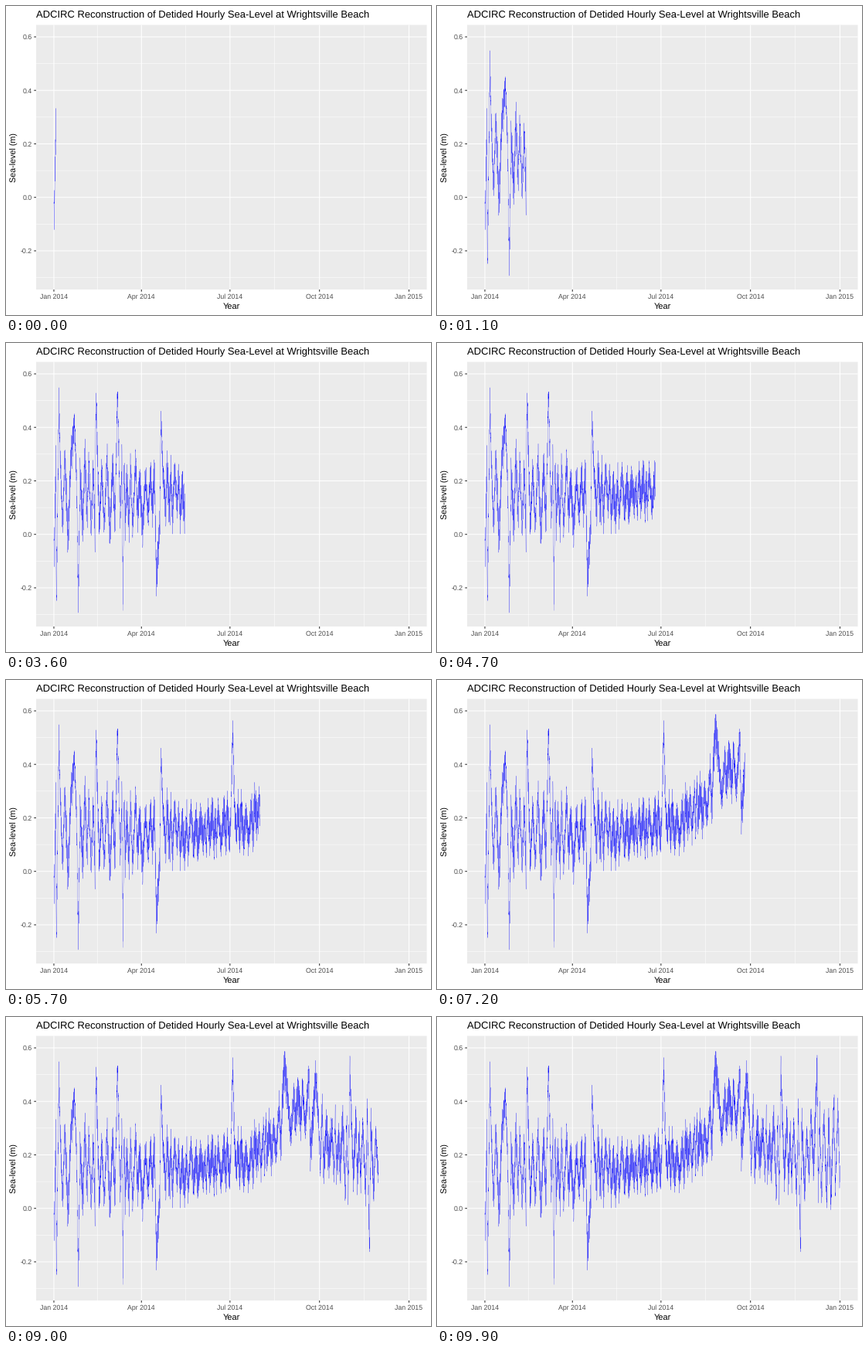
A matplotlib script for the animation above (10 s loop, 550 by 400 pixels).

```python
import numpy as np
import matplotlib.pyplot as plt
from matplotlib.animation import FuncAnimation
from matplotlib.patches import Rectangle

W, H, DPI = 550, 400, 100
FRAMES, INTERVAL = 100, 100
LEFT, RIGHT, TOP, BOTTOM = 39, 544.5, 24.5, 367
X0, X1 = 61.97, 521.5          # 1 January 2014 and 2015
Y0, METRE = 247.7, 346.2       # zero level and pixels per metre
PX = 0.72                      # points per pixel

plt.rcParams["font.family"] = "Liberation Sans"
plt.rcParams["path.simplify"] = False
plt.rcParams["text.hinting"] = "none"

# The year's main surges: x in pixels, level in metres.
STORMS = [
    (62, -0.1), (64.6, 0.26), (65.2, -0.28), (68.5, 0.5), (88.5, 0.42),
    (93.6, -0.25), (116.4, 0.52), (144.3, 0.54), (151.5, -0.28),
    (194.6, -0.17), (200.5, 0.45), (293.4, 0.54), (360.5, 0.54),
    (392, 0.51), (401, 0.49), (445, 0.52), (470.5, -0.16), (492, 0.54),
]


def day_x(day):
    return X0 + (X1 - X0) * day / 365


def level_y(level):
    return Y0 - METRE * level


def seasonal_mean(t):
    return 0.12 + 0.1 * t + 0.17 * np.exp(-((t - 0.68) / 0.08) ** 2)


def seasonal_swing(t):
    return 0.08 + 0.12 * np.cos(np.pi * t) ** 2


def turning_points(rng):
    """Alternating random highs and lows, with the main surges in between."""
    storm_x = np.array(STORMS)[:, 0]
    points, x, side = list(STORMS), X0 + 8, 1
    while x < X1 + 5:
        t = (x - X0) / (X1 - X0)
        level = seasonal_mean(t) + side * seasonal_swing(t) * rng.uniform(0.3, 1)
        if np.abs(storm_x - x).min() > 1.2:
            points.append((x, level))
        x += rng.uniform(1.2, 4.2)
        side = -side
    return np.array(sorted(points)).T


def sea_level():
    """Hourly levels: surge between turning points plus a residual tide."""
    rng = np.random.default_rng(2014)
    hours = np.arange(365 * 24)
    x = day_x(hours / 24)
    surge = np.interp(x, *turning_points(rng))
    tide = (0.75 * np.cos(2 * np.pi * hours / 12.42)
            + 0.25 * np.cos(2 * np.pi * hours / 23.93))
    spring = 0.065 + 0.015 * np.cos(2 * np.pi * hours / (14.77 * 24))
    level = surge + spring * tide + rng.normal(0, 0.006, len(x))
    level[(level < -0.3) | (level > 0.59)] = np.nan
    return x, level_y(level)


fig = plt.figure(figsize=(W / DPI, H / DPI), dpi=DPI, facecolor="white")
ax = fig.add_axes([0, 0, 1, 1])
ax.set(xlim=(0, W), ylim=(H, 0))
ax.axis("off")


def rule(xs, ys, width, color="white"):
    ax.plot(xs, ys, color=color, lw=width * PX, solid_capstyle="butt",
            snap=False, zorder=1)


def label(x, y, text, size, color="black", **kw):
    kw = {"ha": "center", "va": "baseline", **kw}
    ax.text(x, y, text, fontsize=size * PX, color=color, **kw)


ax.add_patch(Rectangle((LEFT, TOP), RIGHT - LEFT, BOTTOM - TOP,
                       fc="#EBEBEB", ec="none", snap=False, zorder=0))

days = [0, 90, 181, 273, 365]
months = ["Jan 2014", "Apr 2014", "Jul 2014", "Oct 2014", "Jan 2015"]
levels = [-0.2, 0.0, 0.2, 0.4, 0.6]

for a, b in zip(days, days[1:]):
    rule([day_x((a + b) / 2)] * 2, [TOP, BOTTOM], 0.53)
for v in levels:
    rule([LEFT, RIGHT], [level_y(v - 0.1)] * 2, 0.53)
for d, name in zip(days, months):
    x = day_x(d)
    rule([x, x], [TOP, BOTTOM], 1.07)
    rule([x, x], [BOTTOM, BOTTOM + 2.75], 1.07, "#333333")
    label(x - 0.3, 379, name, 8.8, "#4D4D4D")
for v in levels:
    y = level_y(v)
    rule([LEFT, RIGHT], [y, y], 1.07)
    rule([LEFT - 2.75, LEFT], [y, y], 1.07, "#333333")
    label(34, y + 3.2, f"{v:.1f}", 8.8, "#4D4D4D", ha="right")

label(LEFT, 15, "ADCIRC Reconstruction of Detided Hourly Sea-Level at "
      "Wrightsville Beach", 13.06, ha="left")
label((LEFT + RIGHT) / 2, 392, "Year", 11)
label(11, (TOP + BOTTOM) / 2, "Sea-level (m)", 10.7, rotation=90, va="center")

xs, ys = sea_level()
line, = ax.plot([], [], color="blue", lw=0.2 * PX, zorder=2)


def update(i):
    n = np.searchsorted(xs, 64.75 + 4.636 * i)
    line.set_data(xs[:n], ys[:n])
    return line,


anim = FuncAnimation(fig, update, frames=FRAMES, interval=INTERVAL,
                     repeat=True, repeat_delay=0)
plt.show()
```
